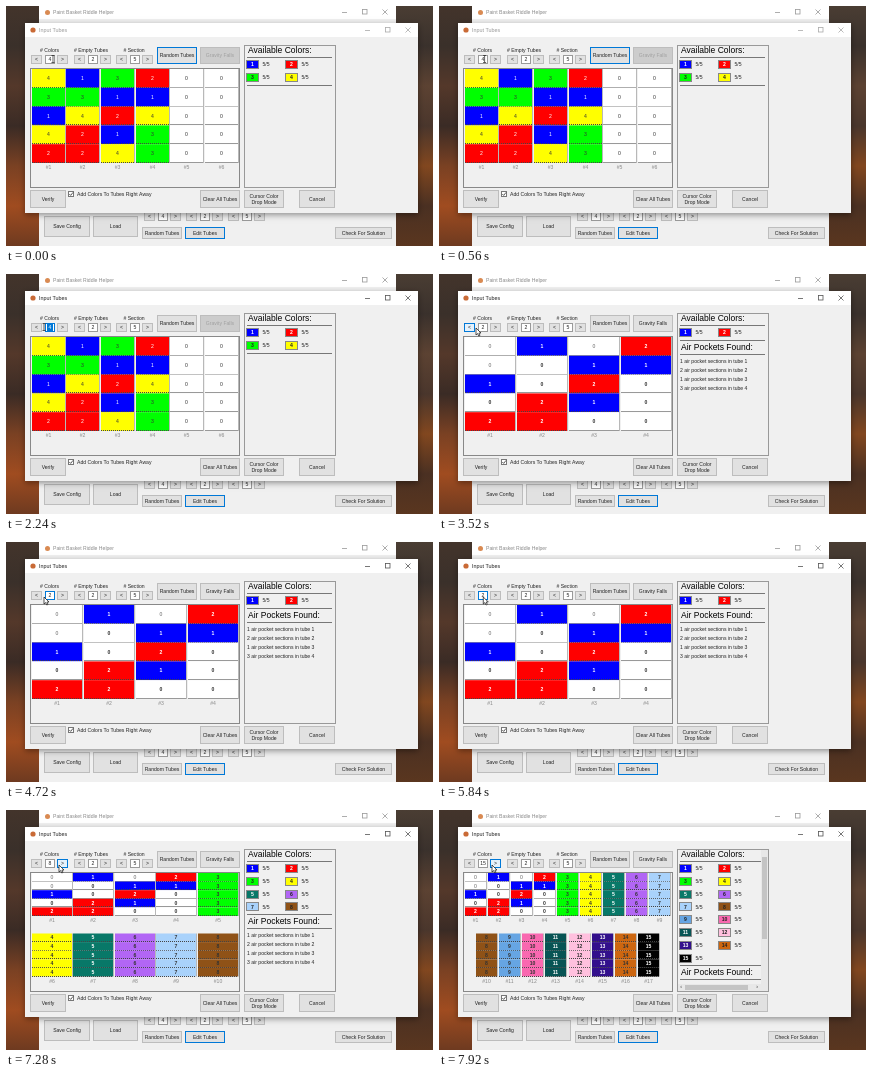
Write an HTML page with a canvas that moves like this. It is 427x240 px and loops after 8 s.

```html
<!DOCTYPE html>
<html lang="en">
<head>
<meta charset="utf-8">
<title>Input Tubes</title>
<style>
  html, body { margin: 0; width: 100%; height: 100%; overflow: hidden; background: #2b211c; }
  canvas { display: block; width: 100vw; height: 100vh; }
</style>
</head>
<body>
<canvas id="stage"></canvas>
<script>
const W = 427, H = 240, LOOP = 8000;
const canvas = document.getElementById('stage');
const ctx = canvas.getContext('2d');
const dpr = window.devicePixelRatio || 1;
canvas.width = Math.round(W * dpr);
canvas.height = Math.round(H * dpr);

const FONT = '"Liberation Sans", Arial, sans-serif';
const BLUE = '#0078d7';
const FACE = '#f0f0f0';
const COLORS = ['#fff', '#00f', '#f00', '#0f0', '#ff0', '#087868', '#b266f5', '#a9d2fb', '#8f5217',
  '#66a5e3', '#f968b0', '#075454', '#ffc0de', '#32108c', '#cc6610', '#000'];
const LIGHT_TEXT = [1, 2, 5, 11, 13, 15];
const TUBES = ['43142', '13422', '31214', '21433'].map(s => [...s].map(Number));

function rect(x, y, w, h, fill, stroke) {
  ctx.fillStyle = fill;
  ctx.fillRect(x, y, w, h);
  if (!stroke) return;
  ctx.strokeStyle = stroke;
  ctx.lineWidth = 1;
  ctx.strokeRect(x + .5, y + .5, w - 1, h - 1);
}

function line(x1, y1, x2, y2, color, { dash = [], width = 1 } = {}) {
  ctx.strokeStyle = color;
  ctx.lineWidth = width;
  ctx.setLineDash(dash);
  ctx.beginPath();
  ctx.moveTo(x1, y1);
  ctx.lineTo(x2, y2);
  ctx.stroke();
  ctx.setLineDash([]);
}

function dot(x, y, r, color) {
  ctx.fillStyle = color;
  ctx.beginPath();
  ctx.arc(x, y, r, 0, 7);
  ctx.fill();
}

function text(str, x, y, { size = 5.1, color = '#222', align = 'left', bold = false } = {}) {
  ctx.font = `${bold ? 'bold ' : ''}${size}px ${FONT}`;
  ctx.fillStyle = color;
  ctx.textAlign = align;
  ctx.textBaseline = 'middle';
  ctx.fillText(str, x, y);
}

function button(label, x, y, w, h, state = '') {
  const off = state === 'off';
  const border = state === 'focus' || state === 'hover' ? BLUE : '#bdbdbd';
  rect(x, y, w, h, off ? '#cccccc' : state === 'hover' ? '#e5f1fb' : '#e1e1e1', border);
  const lines = label.split('\n');
  lines.forEach((s, i) => text(s, x + w / 2, y + h / 2 + .3 + (i - (lines.length - 1) / 2) * 6,
    { align: 'center', color: off ? '#a0a0a0' : '#222' }));
}

function spinner(x, y, value, { less, more, field } = {}) {
  button('<', x, y, 11, 9, less);
  button('>', x + 26, y, 11, 9, more);
  rect(x + 14, y, 10, 9, '#fff', field ? BLUE : '#9a9a9a');
  if (field === 'selected') rect(x + 16, y + 1, 6, 7, BLUE);
  text(value, x + 19, y + 4.8, { align: 'center', color: field === 'selected' ? '#fff' : '#222' });
}

function windowButtons(x, y, color) {
  const max = x + 20.5, close = x + 41, width = .8;
  line(x - 2, y + .5, x + 3, y + .5, color, { width });
  ctx.strokeRect(max - 2, y - 2.5, 4.5, 4.5);
  line(close - 2.5, y - 2.5, close + 2.5, y + 2.5, color, { width });
  line(close + 2.5, y - 2.5, close - 2.5, y + 2.5, color, { width });
}

function wallpaperSide(x, colors) {
  const tone = ctx.createLinearGradient(0, 0, 0, H);
  colors.forEach((c, i) => tone.addColorStop(i / (colors.length - 1), c));
  rect(x, 0, W / 2, H, tone);
}

function wallpaper() {
  wallpaperSide(0, ['#43342b', '#3a302a', '#54382a', '#3a2b25', '#7a4123', '#a04c20', '#6e3a20']);
  wallpaperSide(W / 2, ['#4a3d33', '#3a312c', '#5c4232', '#4a362c', '#82471f', '#4a3022', '#5a361f']);
}

function backWindow() {
  rect(33, 0, 357, H, FACE);
  rect(33, 0, 357, 13, '#fff');
  dot(41.5, 6.5, 2.5, '#d98a52');
  text('Paint Basket Riddle Helper', 47, 6.8, { color: '#888' });
  windowButtons(338, 6, '#999');
  button('Save Config', 38, 210, 46, 21);
  button('Load', 87, 210, 45, 21);
  ['4', '2', '5'].forEach((v, i) => spinner(138 + i * 42, 206, v));
  button('Random Tubes', 136, 221, 40, 12);
  button('Edit Tubes', 179, 221, 40, 12, 'focus');
  button('Check For Solution', 329, 221, 57, 12);
}

// Colours above the count become air; each colour added later brings a full tube of its own.
function tubesFor(s) {
  const tubes = TUBES.map(t => t.map(c => c > s.lowest ? 0 : c));
  for (let i = 4; i < s.count + 2; i++) {
    tubes.push(Array(5).fill(s.lowest === 2 ? i - 1 : 0));
  }
  return tubes;
}

function airPockets(tube) {
  const top = tube.findIndex(c => c);
  return top < 0 ? 0 : tube.slice(top).filter(c => !c).length;
}

function drawTube(tube, number, x, y, w, rowH, bold) {
  const top = tube.findIndex(c => c);
  tube.forEach((c, i) => {
    const cy = y + i * rowH;
    rect(x, cy, w, rowH, COLORS[c]);
    const bottom = Math.round(cy + rowH) - .5;
    line(x, bottom, x + w, bottom, c ? '#444' : '#999', { dash: c ? [1, 1] : [] });
    const leadingAir = !c && i < top;
    text(c, x + w / 2, cy + rowH / 2 + .2, {
      align: 'center',
      bold: bold && !leadingAir,
      color: LIGHT_TEXT.includes(c) ? '#fff' : leadingAir ? '#666' : '#333'
    });
  });
  line(x + w + .5, y, x + w + .5, y + rowH * 5, '#b8b8b8');
  text('#' + number, x + w / 2, y + rowH * 5 + 5, { align: 'center', color: '#888' });
}

function tubePanel(tubes, clearing) {
  rect(24, 62, 210, 120, FACE, '#888');
  const bold = tubes.some(airPockets);
  const twoRows = tubes.length > 9;
  const perRow = twoRows ? Math.ceil(tubes.length / 2) : tubes.length;
  const pitch = 208 / perRow;
  tubes.forEach((tube, i) => {
    const row = Math.floor(i / perRow);
    const inRow = row ? tubes.length - perRow : perRow;
    const x = 25.5 + (208 - inRow * pitch) / 2 + (i % perRow) * pitch;
    drawTube(tube, i + 1, Math.round(x), 63 + row * 60.5, Math.round(pitch - 1.7), twoRows ? 8.6 : 18.8, bold);
  });
  if (clearing) rect(25, 175, 39, 5, '#fff');
}

function scrollbars() {
  rect(322, 40, 7, 134, '#e8e8e8');
  rect(323, 47, 5, 82, '#c4c4c4');
  rect(239, 174, 90, 7, '#e8e8e8');
  rect(246, 175, 63, 5, '#c4c4c4');
  text('‹', 242, 177, { align: 'center' });
  text('›', 318, 177, { align: 'center' });
}

function infoPanel(count, tubes, clearing) {
  rect(238, 39, 92, 143, FACE, '#999');
  ctx.save();
  ctx.beginPath();
  ctx.rect(239, 40, 90, 141);
  ctx.clip();
  const pockets = tubes.map(airPockets);
  const heading = { size: 8.5, color: '#000' };
  if (!clearing) text('Available Colors:', 242, 44.5, heading);
  line(241, 51.5, 326, 51.5, '#777');
  for (let c = 1; c <= count; c++) {
    const x = c % 2 ? 240 : 279;
    const y = 54 + Math.floor((c - 1) / 2) * 12.8;
    rect(x, Math.round(y), 13, 9, clearing ? FACE : COLORS[c], '#888');
    if (clearing) continue;
    text(c, x + 6.5, y + 4.8, { align: 'center', bold: true, color: LIGHT_TEXT.includes(c) ? '#fff' : '#222' });
    text('5/5', x + 16.5, y + 4.8);
  }
  const y = Math.round(54 + Math.ceil(count / 2) * 12.8) - .5;
  line(241, y, 326, y, '#777');
  if (pockets.some(Boolean)) {
    line(241, y + 14, 326, y + 14, '#777');
    if (!clearing) {
      text('Air Pockets Found:', 242, y + 7, heading);
      pockets.filter(Boolean).forEach((n, i) =>
        text(`${n} air pocket sections in tube ${i + 1}`, 241, y + 21 + i * 9.1));
    }
  }
  if (count > 12) scrollbars();
  ctx.restore();
}

function frontWindow(s) {
  ctx.save();
  ctx.shadowColor = 'rgba(0,0,0,.4)';
  ctx.shadowBlur = 6 * dpr;
  ctx.shadowOffsetY = 2 * dpr;
  rect(19, 17, 393, 190, FACE);
  ctx.restore();
  rect(19, 17, 393, 14, '#fff');
  dot(27, 24, 2.6, '#c96a36');
  text('Input Tubes', 33, 24.3, { size: 5.4, color: s.active ? '#222' : '#999' });
  windowButtons(361, 24, s.active ? '#555' : '#aaa');

  text('# Colors', 43.5, 44.3, { align: 'center' });
  text('# Empty Tubes', 85, 44.3, { align: 'center' });
  text('# Section', 128, 44.3, { align: 'center' });
  spinner(25, 49, s.count, s);
  spinner(68, 49, '2');
  spinner(110, 49, '5');

  const tubes = tubesFor(s);
  button('Random Tubes', 151, 41, 40, 17, s.active ? '' : 'focus');
  button('Gravity Falls', 194, 41, 40, 17, tubes.some(airPockets) ? '' : 'off');
  tubePanel(tubes, s.clearing);
  infoPanel(s.count, tubes, s.clearing);

  button('Verify', 24, 184, 36, 18);
  rect(62, 185, 6, 6, '#fff', '#777');
  line(63.3, 188, 64.7, 189.4, '#333', { width: .8 });
  line(64.7, 189.4, 67, 186.4, '#333', { width: .8 });
  text('Add Colors To Tubes Right Away', 71, 188.3);
  button('Clear All Tubes', 194, 184, 40, 18);
  button('Cursor Color\nDrop Mode', 238, 184, 40, 18);
  button('Cancel', 293, 184, 36, 18);
}

// Pointer keys: time, x, y
const PATH = [[0, 47, 53], [880, 45, 53], [1600, 45, 53], [2200, 38, 53], [2800, 38, 53], [2960, 37, 54],
  [4080, 37, 54], [4400, 38, 55], [5520, 38, 55], [6240, 53, 55], [8000, 53, 55]];

function pointerAt(t) {
  const i = PATH.findIndex(k => k[0] > t);
  const [t0, x0, y0] = PATH[i - 1], [t1, x1, y1] = PATH[i];
  const p = (t - t0) / (t1 - t0), e = p * p * (3 - 2 * p);
  return [x0 + (x1 - x0) * e, y0 + (y1 - y0) * e];
}

function pointer(t) {
  const [x, y] = pointerAt(t);
  if (t < 2800) {
    const thin = { width: .7 };
    line(x, y - 3.5, x, y + 3.5, '#222', thin);
    line(x - 1.5, y - 3.5, x + 1.5, y - 3.5, '#222', thin);
    line(x - 1.5, y + 3.5, x + 1.5, y + 3.5, '#222', thin);
    return;
  }
  ctx.beginPath();
  [[0, 0], [0, 7], [1.6, 5.6], [2.8, 8], [4, 7.4], [2.9, 5], [5, 5]]
    .forEach(([dx, dy]) => ctx.lineTo(x + dx, y + dy));
  ctx.closePath();
  ctx.fillStyle = '#fff';
  ctx.fill();
  ctx.strokeStyle = '#111';
  ctx.lineWidth = .7;
  ctx.stroke();
}

function stateAt(t) {
  const lowest = t < 3200 ? 4 : t < 3440 ? 3 : 2;
  return {
    lowest,
    count: t < 6720 ? lowest : Math.min(15, 3 + Math.floor((t - 6720) / 100)),
    active: t >= 960,
    clearing: t >= 6640 && t < 6720,
    less: t >= 2880 && t < 4320 ? 'hover' : '',
    more: t >= 6080 ? 'hover' : '',
    field: t < 960 ? '' : t < 1840 ? 'focus' : t < 2880 ? 'selected' : t >= 4320 && t < 6080 ? 'focus' : ''
  };
}

function draw(now) {
  const t = now % LOOP;
  ctx.setTransform(dpr, 0, 0, dpr, 0, 0);
  wallpaper();
  backWindow();
  frontWindow(stateAt(t));
  pointer(t);
  requestAnimationFrame(draw);
}
requestAnimationFrame(draw);
</script>
</body>
</html>
```
